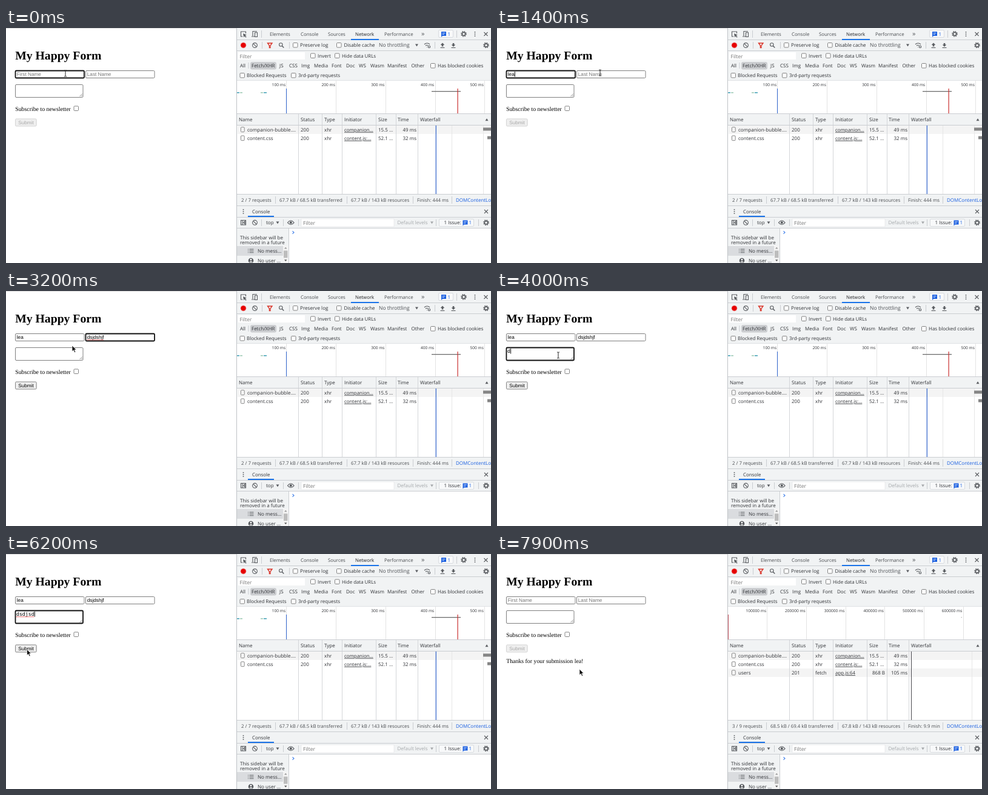
Recreate the animation shown at these times as an HTML page. Size 800 by 388 pixels, loop 8 s.

```html
<!DOCTYPE html>
<html lang="en">
<head>
<meta charset="utf-8">
<title>My Happy Form</title>
<style>
  html, body { margin: 0; width: 100%; height: 100%; overflow: hidden; background: #fff; }
  svg { display: block; width: 800px; height: 388px; }
  text { font: 8px "Open Sans", "Noto Sans", sans-serif; fill: #303236; text-rendering: geometricPrecision; white-space: pre; }
  text.serif { font-family: "Liberation Serif", serif; fill: #000; }
  text.field { font-family: "Liberation Sans", sans-serif; fill: #000; }
  text.mono { font-family: "DejaVu Sans Mono", monospace; fill: #000; }
  .icon { fill: none; stroke: #5a5d61; stroke-width: 1.1; }
</style>
</head>
<body>
<svg id="stage" viewBox="0 0 800 388"></svg>
<script>
const LOOP = 8000, STEP = 100;
const BAR = '#f1f3f4', EDGE = '#cacdd1', BLUE = '#1a5fe0', GREY = '#5a5d61', DIM = '#757575';
const stage = document.getElementById('stage');

function add(parent, tag, attrs = {}, content) {
  const el = document.createElementNS('http://www.w3.org/2000/svg', tag);
  for (const key in attrs) el.setAttribute(key, attrs[key]);
  if (content !== undefined) el.textContent = content;
  return parent.appendChild(el);
}
const group = (parent = stage) => add(parent, 'g');
const rect = (p, x, y, width, height, fill, more) => add(p, 'rect', { x, y, width, height, fill, ...more });
const path = (p, d, more) => add(p, 'path', { d, class: 'icon', ...more });
const circle = (p, cx, cy, r, more) => add(p, 'circle', { cx, cy, r, class: 'icon', ...more });
const label = (p, x, y, str, { size = 8, color, weight = 400, ...more } = {}) =>
  add(p, 'text', { x, y, style: `font-size:${size}px;font-weight:${weight};${color ? 'fill:' + color : ''}`, ...more }, str);
const rightLabel = (p, x, y, str, more) => label(p, x, y, str, { 'text-anchor': 'end', ...more });
const vline = (p, x, y1, y2, color = EDGE, w = 1) => rect(p, x, y1, w, y2 - y1, color);
const hline = (p, y, x1 = 381, x2 = 800, color = EDGE) => rect(p, x1, y, x2 - x1, 1, color);
const tick = (p, x, y, s = 7.5) => rect(p, x + .5, y + .5, s, s, '#fff', { rx: 1.2, stroke: '#767676', 'stroke-width': .9 });
const show = (el, on) => el.setAttribute('visibility', on ? 'inherit' : 'hidden');

function gear(x, y) {
  circle(stage, x, y, 2.7, { style: 'stroke-width:1.7' });
  circle(stage, x, y, 4.2, { style: 'stroke-width:1.3', 'stroke-dasharray': '1.8 1.5' });
}
function ban(x, y) {
  circle(stage, x, y, 3.9);
  path(stage, `M${x - 2.7} ${y - 2.7}l5.4 5.4`);
}
const cross = (x, y) => path(stage, `M${x - 3} ${y - 3}l6 6m0-6l-6 6`);
const down = (x, y, color = GREY) => path(stage, `M${x - 2.5} ${y - 1.6}h5l-2.5 4z`, { style: `fill:${color};stroke:none` });
const dots = (x, y) => [-3.2, 0, 3.2].forEach(d => rect(stage, x - .8, y + d - .8, 1.6, 1.6, GREY));
function bubble(x, y) {
  path(stage, `M${x} ${y}h8v7h-6l-2 2z`, { style: `fill:${BLUE};stroke:none` });
  path(stage, `M${x + 1.6} ${y + 2.3}h4.8m-4.8 2.3h3.2`, { style: 'stroke:#fff;stroke-width:.8' });
}
const badge = (x, y, w) => rect(stage, x, y, w, 12, '#f8f9fa', { rx: 1.5, stroke: '#d9dce0' });

// Developer tools: tabs and filters
function drawTools() {
  rect(stage, 0, 0, 380, 1, '#dcdcdc');
  rect(stage, 381, 0, 419, 388, BAR);
  vline(stage, 380, 0, 388, '#bfc2c6');

  path(stage, 'M395.5 9v-3h-8v8h3');
  path(stage, 'M391 9l6 2.4-2.5 1 2.2 2.4-1.2 1-2-2.4-1.2 2z', { style: `fill:${GREY};stroke:none` });
  path(stage, 'M407 13v-7.5h7m-9 8.5h5');
  rect(stage, 410.5, 7.5, 4, 7, 'none', { class: 'icon' });
  vline(stage, 421, 4, 16);
  [[435, 'Elements'], [486, 'Console'], [531, 'Sources'], [576, 'Network'], [624, 'Performance']]
    .forEach(([x, s]) => label(stage, x, 13, s, { size: 7.85, color: s === 'Network' ? '#202124' : '#4a4d51' }));
  label(stage, 685, 13, '»', { size: 11, color: GREY });
  badge(713.5, 3.5, 24);
  bubble(718, 6);
  label(stage, 728.5, 12.8, '1', { color: BLUE });
  vline(stage, 743, 4, 16);
  gear(755, 9.8);
  dots(773.5, 10);
  cross(791.5, 10);
  hline(stage, 19);
  rect(stage, 569, 18, 46, 2, '#1a73e8');

  circle(stage, 391.5, 28.5, 4.6, { style: 'fill:#e60000;stroke:#f3b4b4;stroke-width:.8' });
  ban(410.5, 28.5);
  path(stage, 'M431.5 25h7.5l-3 4v3.5h-1.6v-3.5z', { style: 'stroke:#d93025;stroke-width:1.3' });
  circle(stage, 453.3, 27.5, 2.7);
  path(stage, 'M455.3 29.5l3 3', { style: 'stroke-width:1.5' });
  [422, 467, 707].forEach(x => vline(stage, x, 23, 34));
  tick(stage, 473, 24);
  label(stage, 485, 31.2, 'Preserve log', { size: 8.15 });
  tick(stage, 545, 24);
  label(stage, 557.5, 31.2, 'Disable cache');
  label(stage, 615, 31.2, 'No throttling', { size: 8.5, color: '#4a4d51' });
  down(677.5, 28);
  path(stage, 'M690 27q4.5-4 9 0m-7 2.2q2.5-2 4 0m-2 2.5l.5-.5');
  circle(stage, 698, 31, 1.7);
  [[720, 1], [738, -1]].forEach(([x, up]) => {
    const y = up > 0 ? 24.5 : 31;
    path(stage, `M${x} ${y}l3.3 ${up * 3.5}h-2v${up * 2.5}h-2.6v${-up * 2.5}h-2z`, { style: `fill:${GREY};stroke:none` });
    path(stage, `M${x - 3.5} 32.5h7`);
  });
  gear(792, 28.5);
  hline(stage, 37);

  rect(stage, 383, 40, 110, 12, '#fff');
  label(stage, 385.5, 49.7, 'Filter', { size: 8.5, color: DIM });
  tick(stage, 502, 41.5);
  label(stage, 514, 48.7, 'Invert');
  tick(stage, 542, 41.5);
  label(stage, 554, 48.7, 'Hide data URLs', { size: 7.9 });

  rect(stage, 403, 56, 43, 12.5, '#cbcdd0', { rx: 3 });
  vline(stage, 399.5, 57, 67);
  [[386, 'All'], [405, 'Fetch/XHR'], [451, 'JS'], [467, 'CSS'], [487, 'Img'], [508, 'Media'], [537, 'Font'],
    [561, 'Doc'], [582, 'WS'], [601, 'Wasm'], [629, 'Manifest'], [668.5, 'Other'], [712, 'Has blocked cookies']]
    .forEach(([x, s]) => label(stage, x, 65, s));
  tick(stage, 700, 58);
  tick(stage, 385.5, 74);
  label(stage, 397, 81, 'Blocked Requests');
  tick(stage, 470, 74);
  label(stage, 482, 81, '3rd-party requests');
}

// Timeline strip; each step is a grid line with its time
function drawOverview(step, width) {
  const g = group();
  for (let i = 1, x; (x = 380.7 + i * width) < 800; i++) {
    vline(g, Math.round(x), 87, 141, '#e3e3e3');
    rightLabel(g, x - 1.3, 96, i * step + ' ms', { size: 6.6 });
  }
  return g;
}

function drawRow(parent, i, name, status, type, from) {
  const y = 161 + i * 14.1;
  if (i % 2 === 0) rect(parent, 382, Math.round(y), 418, 14, '#f4f4f4');
  rect(parent, 387.5, y + 2.8, 5.6, 7.8, '#fff', { rx: 1, stroke: '#777', 'stroke-width': .9 });
  label(parent, 398, y + 9.8, name, { size: 8.1 });
  label(parent, 486, y + 9.8, status);
  label(parent, 525, y + 9.8, type);
  label(parent, 558, y + 9.8, from, { size: 7.9, 'text-decoration': 'underline' });
}

function drawSummary(requests, sent, loaded, finish) {
  const g = group();
  [[388, requests + ' requests'], [451, sent + ' kB transferred'], [569, loaded + ' kB resources'], [678, 'Finish: ' + finish]]
    .forEach(([x, s]) => label(g, x, 286.7, s, { size: 7.85, color: '#4a4d51' }));
  return g;
}

function drawConsole() {
  hline(stage, 293);
  dots(391.5, 303);
  label(stage, 406, 306, 'Console', { size: 7.85 });
  cross(792, 303);
  hline(stage, 312);
  rect(stage, 399, 310, 43, 2, '#1a73e8');
  rect(stage, 387.5, 317.5, 8, 7.5, 'none', { class: 'icon' });
  path(stage, 'M390 317.5v7.5m4-6l-2.5 2.3 2.5 2.3z');
  ban(410.5, 321.3);
  label(stage, 429, 324.2, 'top');
  down(448, 321);
  path(stage, 'M464.5 321.3q5.3-6.5 10.6 0q-5.3 6.5-10.6 0z');
  circle(stage, 469.8, 321.3, 1.5, { style: `fill:${GREY}` });
  [421, 457, 482, 709, 779].forEach(x => vline(stage, x, 316, 327));
  rect(stage, 487, 315, 153, 13, '#fff', { stroke: '#dfe1e4', 'stroke-width': .6 });
  label(stage, 490, 324.5, 'Filter', { size: 8.5, color: DIM });
  label(stage, 645.5, 324.2, 'Default levels', { color: '#a5a8ab' });
  down(702.5, 321, '#a5a8ab');
  badge(714.5, 315.5, 57);
  label(stage, 722.5, 324.2, '1 Issue:');
  bubble(753.5, 317.5);
  label(stage, 763.5, 324.2, '1', { color: BLUE });
  gear(792, 321.3);
  hline(stage, 330);

  rect(stage, 467, 331, 333, 57, '#fff');
  path(stage, 'M472.5 335.3l2.5 2.3-2.5 2.3', { style: 'stroke:#3579e8' });
  label(stage, 386, 348.6, 'This sidebar will be');
  label(stage, 386, 357.3, 'removed in a future');
  rect(stage, 381, 360, 76, 16, '#dadcdf');
  path(stage, 'M401.5 365.3h7m-7 2.7h7m-7 2.7h7m-9.5-5.4h1m-1 2.7h1m-1 2.7h1');
  label(stage, 415, 370.8, 'No mess…', { size: 8.1 });
  circle(stage, 404, 384, 4.3, { style: `fill:${GREY};stroke:none` });
  circle(stage, 404, 382.5, 1.4, { style: 'fill:#fff;stroke:none' });
  path(stage, 'M401.3 386.5q2.7-2.4 5.4 0l-2.7 1z', { style: 'fill:#fff;stroke:none' });
  label(stage, 415, 387, 'No user …', { size: 8.1 });
  rect(stage, 457, 359, 8.5, 29, '#f4f4f4');
  rect(stage, 458, 367.5, 6.5, 12, '#bdbdbd');
  path(stage, 'M459 364.5h4.5l-2.25-2.7z', { style: 'fill:#999;stroke:none' });
  path(stage, 'M459 382.5h4.5l-2.25 2.7z', { style: 'fill:#555;stroke:none' });
  vline(stage, 466, 331, 388);
}

drawTools();

// White sheets first, so every state group lies above them
rect(stage, 381, 87, 419, 54, '#fff');
rect(stage, 381, 161, 419, 113, '#fff');
hline(stage, 86, 381, 800, '#dfe1e4');
hline(stage, 141);

drawRow(stage, 0, 'companion-bubble.…', '200', 'xhr', 'companion…');
drawRow(stage, 1, 'content.css', '200', 'xhr', 'content.js:…');
[['15.5 …', '49 ms'], ['52.1 …', '32 ms']].forEach(([size, time], i) => {
  label(stage, 614, 170.8 + i * 14.1, size);
  rightLabel(stage, 677, 170.8 + i * 14.1, time);
});

const after = group();
drawRow(after, 2, 'users', '', 'fetch', 'app.js:64');
vline(after, 381, 100, 141, '#c4525e');
vline(after, 783, 161, 274, '#e6e6e6');

const before = drawOverview(100, 81.7), pending = drawOverview(100, 81.7), done = drawOverview(100000, 64.65);
rect(before, 381, 106, 4, 1.5, '#3f9fb5');
rect(before, 386, 106, 4, 1.5, '#9cc9b4');
rect(before, 420, 106, 4, 1.5, '#9cc9b4');
rect(before, 425, 106, 5, 1.5, '#3f9fb5');
vline(before, 462, 100, 141, '#2f62c9');
rect(before, 702, 104, 48, 1.3, '#6d6d6d');
vline(before, 744.5, 100, 141, '#c92f2f', 1.2);
[735, 787].forEach(x => vline(before, x, 161, 274, '#e6e6e6'));
vline(before, 708.7, 161, 274, '#2f62c9', 1.2);
rect(before, 787, 164.5, 13, 5, '#858585');
rect(before, 794, 178.6, 6, 5, '#858585');
rect(done, 765.5, 104, 1.5, 1.2, '#b5b5b5');

[[pending, '(pendi…', '0 B', 'Pending', '#666', '#d23b3b'], [done, '201', '868 B', '105 ms', '', '#4a4a50']]
  .forEach(([g, status, size, time, color, line]) => {
    label(g, 486, 199, status, { color });
    rightLabel(g, 640, 199, size);
    rightLabel(g, 677, 199, time, { color });
    vline(g, 683, 161, 274, line);
  });

[482, 521, 554, 610, 643, 679].forEach(x => vline(stage, x, 142, 274, '#d4d6d9'));
[[384, 'Name'], [486, 'Status'], [525, 'Type'], [558, 'Initiator'], [614, 'Size'], [646, 'Time'], [683, 'Waterfall']]
  .forEach(([x, s]) => label(stage, x, 154.3, s));
path(stage, 'M790.5 153.3h5l-2.5-4z', { style: `fill:${GREY};stroke:none` });
hline(stage, 160);
hline(stage, 274);

const totals = [
  drawSummary('2 / 7', '67.7 kB / 68.5', '67.7 kB / 143', '444 ms'),
  drawSummary('3 / 8', '67.7 kB / 68.5', '67.7 kB / 143', '444 ms'),
  drawSummary('3 / 9', '68.5 kB / 69.4', '67.8 kB / 143', '9.9 min')
];
[444, 562, 671, 735].forEach(x => vline(stage, x, 278, 290));
label(stage, 742, 286.7, 'DOMContentLoaded', { color: BLUE });
drawConsole();

// Form
label(stage, 15.2, 51.8, 'My Happy Form', { class: 'serif', size: 19.7, weight: 700 });
label(stage, 15.2, 136.7, 'Subscribe to newsletter', { class: 'serif', size: 9.83 });
tick(stage, 111.5, 128.5);

function makeField(x, y, w, h, keys, hint, cls, red) {
  const left = x + (cls === 'mono' ? 2 : 2.8);
  const f = { x, y, w, h, left, keys, hint, red };
  f.box = rect(stage, x + .5, y + .5, w - 1, h - 1, '#fff', { rx: 1.5 });
  f.text = label(stage, left, y + 9.2, '', { class: cls, size: 8.2 });
  f.line = path(stage, '', { style: 'stroke:#e22;stroke-width:.9', 'stroke-dasharray': '1.6 .7' });
  f.caret = rect(stage, 0, y + 2, .9, 8.6, '#000');
  return f;
}
const word = (str, start, gap) => ({ str, start, gap });
const first = makeField(15, 70, 114.5, 13, word('lea', 500, 250), 'First Name', 'field');
const last = makeField(131, 70, 114.5, 13, word('dsjdshjf', 1900, 100), 'Last Name', 'field', 'focus');
const area = makeField(15, 93, 112.5, 22, word('dsdjsd', 3900, 180), '', 'mono', 'always');
path(stage, 'M121.5 113l4.5-4.5m-1.8 4.5l1.8-1.8', { style: 'stroke:#777;stroke-width:.8' });
const fields = [first, last, area];

const button = rect(stage, 15.5, 150, 34.7, 12, '#efefef', { rx: 1.6, 'stroke-width': .9 });
const submit = label(stage, 20.2, 158.8, 'Submit', { class: 'field', size: 8.2 });
const thanks = label(stage, 15.2, 180.3, 'Thanks for your submission lea!', { class: 'serif', size: 9.83 });

const arrow = path(stage, 'M0 0v9.8l2.3-2.1 1.7 3.8 1.7-.8-1.7-3.6h3z', { style: 'fill:#111;stroke:#fff;stroke-width:.7' });
const beam = path(stage, 'M-2-5h1.5l.5.5.5-.5h1.5m-2 .5v9m-2 .5h1.5l.5-.5.5.5h1.5', { style: 'stroke:#222;stroke-width:1' });

const SEND = 6800, REPLY = 7300;
const focusTimes = [[-600, first], [1500, last], [3600, area], [SEND, null]];
const route = [[0, 98, 75], [900, 98, 75], [1400, 170, 74], [2800, 170, 74], [3200, 109, 90], [3500, 101, 106],
  [4900, 101, 106], [5400, 95, 127], [6200, 34.5, 157.5], [REPLY, 34.5, 157.5], [7900, 136, 190], [LOOP, 136, 190]];

function mouseAt(t) {
  const i = route.findIndex(p => p[0] > t);
  const [t0, x0, y0] = route[i - 1], [t1, x1, y1] = route[i];
  const k = (t - t0) / (t1 - t0), e = k * k * (3 - 2 * k);
  return [x0 + (x1 - x0) * e, y0 + (y1 - y0) * e];
}

function drawField(f, t, focused, since) {
  const { str, start, gap } = f.keys;
  const count = t < start || t >= REPLY ? 0 : Math.min(str.length, Math.floor((t - start) / gap) + 1);
  f.text.textContent = count ? str.slice(0, count) : f.hint;
  f.text.style.fill = count ? '#000' : DIM;
  f.box.setAttribute('stroke', focused ? '#101010' : '#808080');
  f.box.setAttribute('stroke-width', focused ? 1.8 : 1);
  const end = f.left + (count ? f.text.getComputedTextLength() : 0);
  const lastKey = count ? start + (count - 1) * gap : since;
  f.caret.setAttribute('x', end + .3);
  show(f.caret, focused && Math.floor((t - lastKey) / 500) % 2 === 0);
  f.line.setAttribute('d', `M${f.left} ${f.y + 10.7}H${end}`);
  show(f.line, count > 1 && (f.red === 'always' || (f.red && focused)));
  return count;
}

function render(time) {
  const t = Math.floor((time % LOOP) / STEP) * STEP;
  const [since, active] = focusTimes.filter(([at]) => at <= t).pop();
  const counts = fields.map(f => drawField(f, t, f === active, since));

  const enabled = counts[0] > 0 && counts[1] > 0 && t < SEND;
  button.setAttribute('stroke', enabled ? '#767676' : '#d0d0d0');
  submit.style.fill = enabled ? '#000' : '#a8a8a8';
  show(thanks, t >= REPLY);

  const phase = t >= REPLY ? 2 : t > SEND ? 1 : 0;
  [before, pending, done].forEach((g, i) => show(g, i === phase));
  totals.forEach((g, i) => show(g, i === phase));
  show(after, phase > 0);

  const [x, y] = mouseAt(t);
  const typing = fields.some(f => x > f.x && x < f.x + f.w && y > f.y && y < f.y + f.h);
  [[arrow, !typing], [beam, typing]].forEach(([el, on]) => {
    el.setAttribute('transform', `translate(${x} ${y})`);
    show(el, on);
  });
}

const begin = performance.now();
(function loop() {
  render(performance.now() - begin);
  requestAnimationFrame(loop);
})();
</script>
</body>
</html>
```
